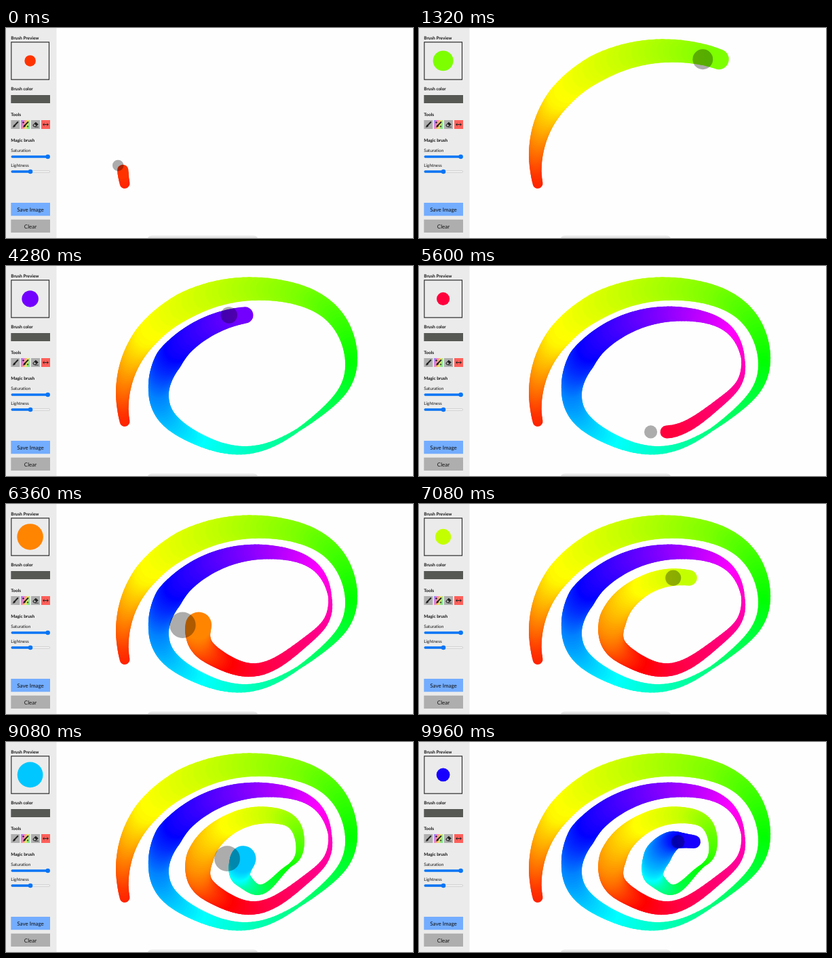
An HTML page with a canvas for the animation above (10 s loop, 600 by 310 pixels).

```html
<!DOCTYPE html>
<html lang="en">
<head>
<meta charset="utf-8">
<title>Magic brush</title>
<style>
  html, body { margin: 0; width: 100%; height: 100%; overflow: hidden; background: #fefefe; }
  canvas, svg { position: absolute; left: 0; top: 0; }
  text { font: 6.4px Lato, sans-serif; fill: #111; text-rendering: geometricPrecision; }
  .head { font-weight: 700; }
  .label { font-size: 8px; text-anchor: middle; }
</style>
</head>
<body>
<canvas id="stage" width="600" height="310"></canvas>
<svg width="600" height="310">
  <defs>
    <linearGradient id="rainbow" x2="1" y2="0.3">
      <stop offset="0" stop-color="#7a7cff"/><stop offset="0.25" stop-color="#e070e0"/>
      <stop offset="0.5" stop-color="#ffa080"/><stop offset="0.75" stop-color="#e8e860"/>
      <stop offset="1" stop-color="#80e890"/>
    </linearGradient>
    <linearGradient id="shade" x2="0" y2="1">
      <stop offset="0" stop-color="#f4f4f4"/><stop offset="1" stop-color="#dcdcdc"/>
    </linearGradient>
    <g id="brush">
      <path d="M10 3L5.8 7.4" stroke="#222" stroke-width="2" stroke-linecap="round"/>
      <path d="M5.6 6.8Q3.4 6.8 3.3 9Q3 10 2.3 10.2Q5.8 11.2 6.8 8.2Z" fill="#222"/>
    </g>
  </defs>
  <path d="M209 310Q211 306 217 306H363Q369 306 371 310Z" fill="url(#shade)"/>
  <path d="M0 0H74.5V310H0Z" fill="#ebebeb"/>

  <text class="head" x="7.3" y="17.3">Brush Preview</text>
  <path d="M7.8 20.8H63.5V76.2H7.8Z" fill="none" stroke="#333" stroke-width="1.2"/>
  <circle id="preview" cx="35.6" cy="48.4"/>

  <text class="head" x="7.3" y="92.3">Brush color</text>
  <path d="M7.3 99H65V111H7.3Z" fill="#555853"/>

  <text class="head" x="7.3" y="129.6">Tools</text>
  <path d="M7.3 136H20.3V149H7.3ZM37 136H50V149H37Z" fill="#aeaeae"/>
  <path d="M22.2 136H35.2V149H22.2Z" fill="url(#rainbow)"/>
  <path d="M52 136H65V149H52Z" fill="#ff5f5a"/>
  <use href="#brush" x="7.3" y="136"/>
  <use href="#brush" x="22.4" y="136"/>
  <path d="M25.5 138v3M24 139.5h3M32 144v2.6M30.7 145.3h2.6" stroke="#222" stroke-width=".8"/>
  <path d="M39.2 143.4L43.8 138.8L47.8 142.2L43.6 146.2H41.2Z" fill="#222"/>
  <path d="M40.5 143.4L42.1 141.8L44.3 144.1L43.2 145.2H41.7Z" fill="#aeaeae"/>
  <path d="M43 146.2h5" stroke="#222" stroke-width=".8"/>
  <path d="M55 142.5H62M56.6 140.6L54.6 142.5L56.6 144.4M60.4 140.6L62.4 142.5L60.4 144.4" fill="none" stroke="#222"/>

  <text class="head" x="7.3" y="168">Magic brush</text>
  <text x="7.3" y="183.2">Saturation</text>
  <rect x="7.5" y="188.3" width="57" height="3.4" rx="1.7" fill="#0875f5"/>
  <circle cx="61.6" cy="190" r="3.3" fill="#0875f5"/>
  <text x="7.3" y="205.2">Lightness</text>
  <rect x="7.7" y="210.5" width="57" height="3" rx="1.5" fill="#efefef" stroke="#b8b8b8" stroke-width=".5"/>
  <rect x="7.5" y="210.3" width="28" height="3.4" rx="1.7" fill="#0875f5"/>
  <circle cx="36" cy="212" r="3.3" fill="#0875f5"/>

  <path d="M7.3 258H65V277.3H7.3Z" fill="#73adff"/>
  <text class="label" x="36" y="270.6">Save Image</text>
  <path d="M7.3 282.8H65V302H7.3Z" fill="#aeaeae"/>
  <text class="label" x="36" y="295.6">Clear</text>
</svg>
<script>
const LOOP = 10000, FRAME = 40, START = -80, STEP = 20;
const { sin, cos, exp, abs, round, min, PI } = Math;
const ctx = document.getElementById('stage').getContext('2d');
const preview = document.getElementById('preview');

// Pace of the hand: [ms, turns made]
const pace = [
  [START, -0.038], [0, -0.018], [750, 0.098], [1320, 0.345], [3300, 1], [3850, 1.1], [5050, 1.48],
  [5600, 1.755], [6820, 2.16], [7080, 2.31], [8200, 2.765], [9750, 3.25], [9960, 3.36]
];

function turnsAt(t) {
  const i = Math.max(1, pace.findIndex(([end]) => t <= end));
  const [t0, n0] = pace[i - 1], [t1, n1] = pace[i];
  return n0 + (n1 - n0) * (t - t0) / (t1 - t0);
}

// Shrinking, slanted ellipse with a drifting centre
function spiral(n) {
  const angle = 2 * PI * n;
  const width = 173.6 - 34 * n - 4.67 * n * n;
  const height = 134.75 - 32 * n;
  const slant = 0.13 + 0.03 * n + 0.12 * exp(-12 * n);
  const flick = exp(20 * (n - 3.2));
  const flatten = 11 * sin(2 * angle) ** 2 * sin(angle / 2 - 0.5) ** 2;
  return [
    345.6 + 17 * n - 2.33 * n * n - width * cos(angle) + flick,
    158.5 + 5 * n - height * sin(angle - slant) - flatten
  ];
}

// Triangle wave between 2.5 and 20
function radiusAt(t) {
  const cycle = (t - 923) / 2748;
  return 20 - 35 * abs(cycle - round(cycle));
}

const colorAt = t => `hsl(${12 + 0.0596 * t}, 100%, 50%)`;

function draw(t) {
  ctx.clearRect(0, 0, 600, 310);
  ctx.lineCap = 'round';
  let [x, y] = spiral(turnsAt(START));
  for (let s = START + STEP; s <= t; s += STEP) {
    ctx.beginPath();
    ctx.moveTo(x, y);
    [x, y] = spiral(turnsAt(s));
    ctx.lineTo(x, y);
    ctx.lineWidth = 2 * radiusAt(s);
    ctx.strokeStyle = colorAt(s);
    ctx.stroke();
  }
  const shift = min(1, t / 500), r = radiusAt(t);
  ctx.fillStyle = 'rgba(0, 0, 0, 0.32)';
  ctx.beginPath();
  ctx.arc(x - 7 - 16.5 * shift, y - 7 + 7 * shift, r, 0, 2 * PI);
  ctx.fill();
  preview.setAttribute('r', r);
  preview.setAttribute('fill', colorAt(t));
}

function tick() {
  draw(Math.floor(performance.now() % LOOP / FRAME) * FRAME);
  requestAnimationFrame(tick);
}
tick();
</script>
</body>
</html>
```
